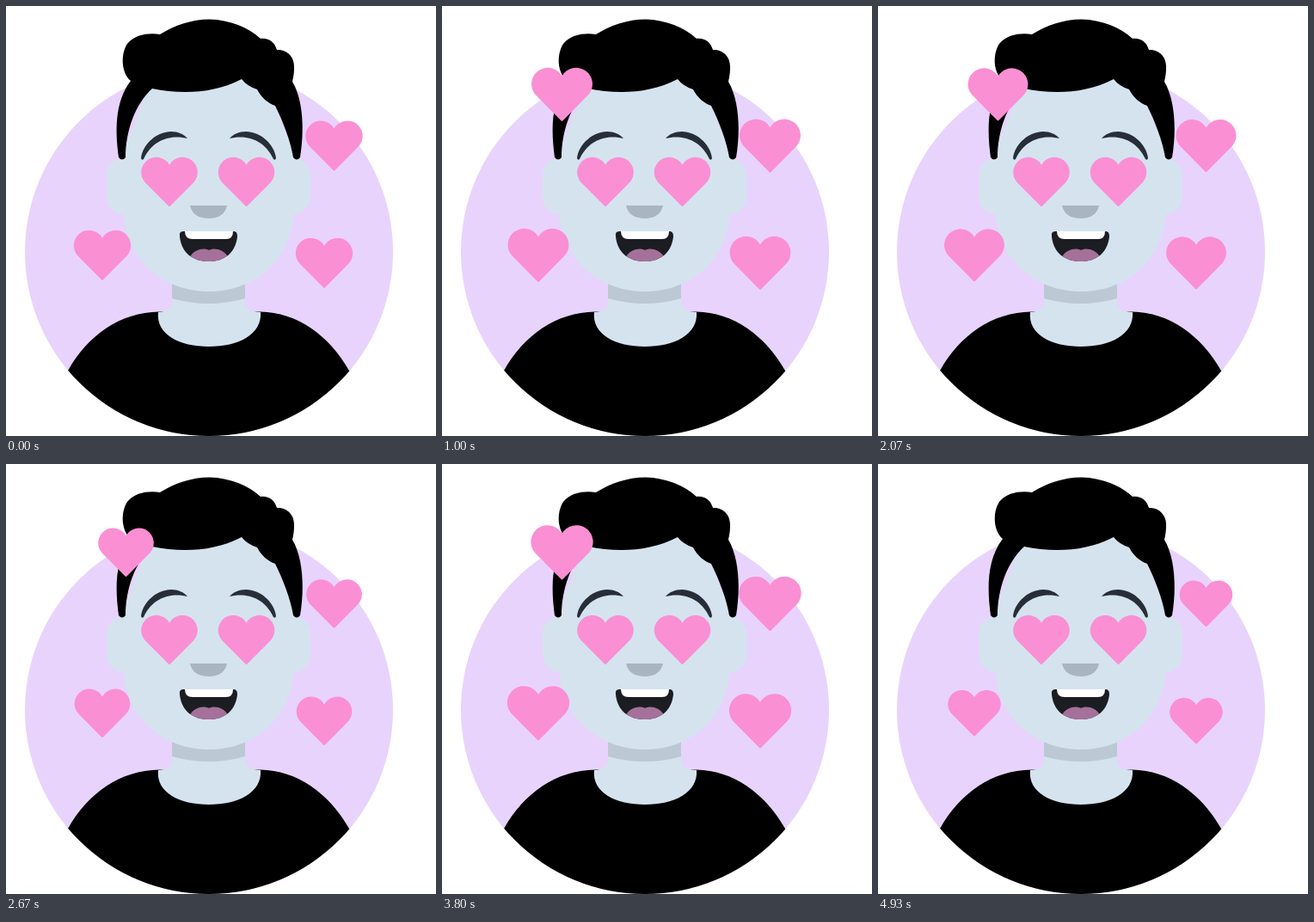
Animation, 500 px wide and 500 px high, one loop 4990 ms. Source, as an HTML page:

```html
<!DOCTYPE html>
<html lang="en">
<head>
<meta charset="utf-8">
<title>Heart eyes</title>
<style>
html, body { margin: 0; width: 100%; height: 100%; overflow: hidden; background: #fff; }
svg { display: block; width: 100vw; height: 100vh; }
</style>
</head>
<body>
<svg viewBox="0 0 500 500">
  <defs>
    <path id="heart" fill="#fa8fd4" d="M1 28.6Q0 29.6 -1 28.6L-28.4 .9A17.5 17.5 0 1 1 0 -19.2A17.5 17.5 0 1 1 28.4 .9Z"/>
    <path id="mouth" d="M206 262Q201 262 202 268C204 287 217 297 236 297C254 297 267 287 269 268Q269 262 265 262Z"/>
    <clipPath id="disc"><circle cx="236" cy="286" r="214"/></clipPath>
    <clipPath id="neck"><rect x="193" y="300" width="85" height="60"/></clipPath>
    <clipPath id="inMouth"><use href="#mouth"/></clipPath>
  </defs>

  <circle cx="236" cy="286" r="214" fill="#e8d3fc"/>

  <!-- body -->
  <path clip-path="url(#disc)" d="M60 440L72 424C95 383 133 356 178 355.5H296C338 356 376 383 399 424L412 440V500H60Z"/>
  <g fill="#d5e3ef">
    <path d="M193 300H278V346Q279 355 296 356C298 382 270 396 236 396C202 396 174 382 177 356Q192 355 193 346Z"/>
    <path clip-path="url(#neck)" fill="#bcc8d3" d="M193 300H278V340Q236 352 193 340Z"/>
    <rect x="117" y="177" width="42" height="65" rx="20"/>
    <rect x="312" y="177" width="42" height="65" rx="20"/>
    <path d="M136 170L170 85H300L335 170V232C335 294 290 332 236 332C182 332 136 294 136 232Z"/>
  </g>

  <!-- hair -->
  <path d="M131 176C127 146 126 112 145 87C134 78 133 56 141 44C150 33 166 31 179 33C195 23 215 15.5 237 15.5C260 16 282 25 296 38C306 37 312 42 315 51C327 50 336 60 335 72C335 79 334 83 333 88C346 110 347 146 342 176Q338 181 334 176C331 157 322 134 313 116C305 113 297 107 292 97Q280 93 274 85C241 102 204 103 170 96C150 114 139 146 139 176Q135 181 131 176Z"/>

  <!-- face -->
  <g fill="#272e38">
    <path id="brow" d="M157 177C159 160 176 146 192 146C200 146 207 149 211 154C196 150 172 152 160 178Q158 180 157 177Z"/>
    <use href="#brow" transform="matrix(-1 0 0 1 471 0)"/>
  </g>
  <use href="#mouth" fill="#1b1d22"/>
  <path fill="#fff" d="M208 262H264Q264 271 256 271H217Q208 271 208 262Z"/>
  <path clip-path="url(#inMouth)" fill="#a5719a" d="M214 292C219 282 231 281 236 284C241 281 253 282 258 292V300H214Z"/>
  <path fill="#a9b5c0" d="M214 232H257C255 242 247 247 236 247C224 247 216 242 214 232Z"/>
  <use href="#heart" x="190" y="204"/>
  <use href="#heart" x="279.5" y="204"/>

  <g id="floating"></g>
</svg>
<script>
const LOOP = 4990, STEP = 200 / 3;
const BEAT = 13.5, LOW_AT = 9.65;   // in steps
const MIN = 58.2, MAX = 74, BASE = 67;
const REST = [[139.5, 102.3], [381.5, 162], [370, 298.3], [112, 289.3]];

const layer = document.getElementById('floating');
const hearts = REST.map(() => {
  const use = document.createElementNS('http://www.w3.org/2000/svg', 'use');
  use.setAttribute('href', '#heart');
  return layer.appendChild(use);
});

const clamp = v => Math.min(1, Math.max(0, v));
const smooth = v => (1 - Math.cos(Math.PI * v)) / 2;

// Even rise, then a fall that starts faster.
function beatScale(n) {
  const phase = (((n - LOW_AT) % BEAT + BEAT) % BEAT) / BEAT * 2;
  const level = phase < 1 ? smooth(phase) : 1 - smooth((phase - 1) ** 0.72);
  return (MIN + (MAX - MIN) * level) / BASE;
}

function draw(ms) {
  const n = Math.floor((ms % LOOP + 5) / STEP);
  const scale = beatScale(n);
  const enter = clamp((n - 4.5) / 8), leave = clamp((n - 59) / 8);
  const drop = 34 * (1 - enter) - 48 * leave;
  hearts.forEach((heart, i) => {
    const [x, y] = REST[i];
    heart.setAttribute('transform', `translate(${x} ${i ? y : y + drop}) scale(${scale})`);
  });
  hearts[0].setAttribute('opacity', clamp(enter * 1.4) * (1 - leave));
}

const start = performance.now();
function tick() {
  draw(performance.now() - start);
  requestAnimationFrame(tick);
}
tick();
</script>
</body>
</html>
```
